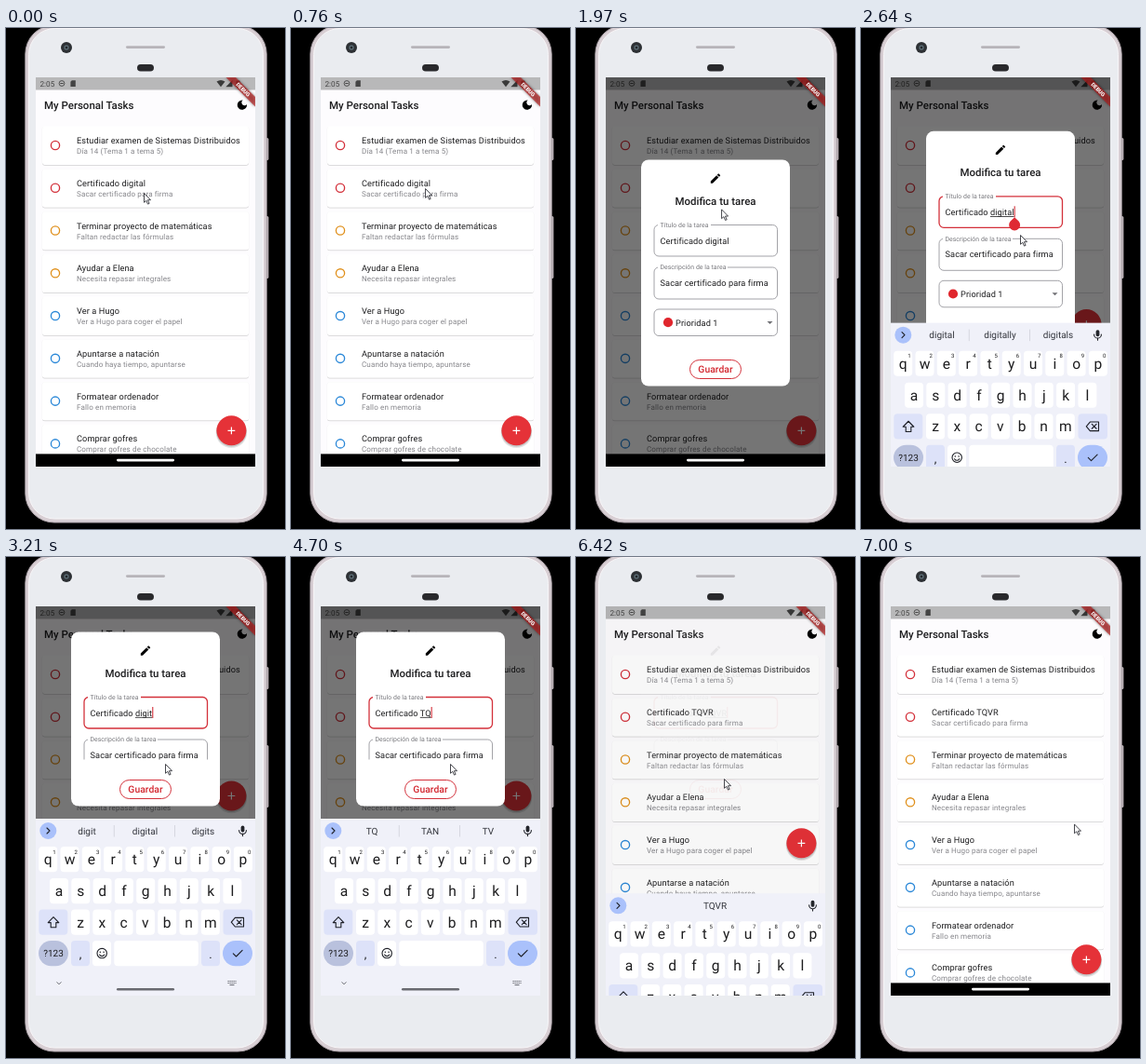
Animation of 300x538 px, one loop 7030 ms. Source, as an HTML page:

```html
<!DOCTYPE html>
<html lang="es">
<head>
<meta charset="utf-8">
<title>My Personal Tasks</title>
<style>
  html, body { margin: 0; width: 100%; height: 100%; overflow: hidden; background: #000; }
  svg { display: block; width: 100%; height: 100%; }
  text { font-family: Roboto, "Noto Sans", sans-serif; white-space: pre; fill: #1d1d1f; text-rendering: geometricPrecision; }
  .body { font-size: 9.2px; letter-spacing: .09px; }
  .sub { font-size: 8.04px; letter-spacing: .14px; fill: #85858a; }
  .head { font-size: 11.48px; font-weight: 500; }
  .label { font-size: 6.9px; letter-spacing: .04px; fill: #77777c; }
  .mid { text-anchor: middle; }
  .key { font-size: 15.6px; }
  .num { font-size: 6px; }
  .hint { font-size: 10px; fill: #33353c; }
  .line { fill: none; stroke: #1d1f26; stroke-width: 1.1; stroke-linecap: round; stroke-linejoin: round; }
  .ribbon { fill: rgba(183, 28, 28, .66); filter: drop-shadow(0 0 1.6px rgba(0, 0, 0, .7)); }
</style>
</head>
<body>
<svg id="stage" viewBox="0 0 300 538" xmlns="http://www.w3.org/2000/svg"></svg>
<script>
const LOOP = 7030;
const RED = '#d3303a', ORANGE = '#e0901c', BLUE = '#2b88d8';
const WORD = 'digital', NEW_WORD = 'TQVR';

const tasks = [
  ['Estudiar examen de Sistemas Distribuidos', 'Día 14 (Tema 1 a tema 5)', RED],
  ['Certificado digital', 'Sacar certificado para firma', RED],
  ['Terminar proyecto de matemáticas', 'Faltan redactar las fórmulas', ORANGE],
  ['Ayudar a Elena', 'Necesita repasar integrales', ORANGE],
  ['Ver a Hugo', 'Ver a Hugo para coger el papel', BLUE],
  ['Apuntarse a natación', 'Cuando haya tiempo, apuntarse', BLUE],
  ['Formatear ordenador', 'Fallo en memoria', BLUE],
  ['Comprar gofres', 'Comprar gofres de chocolate', BLUE]
];

// time, typed word, keyboard suggestions
const typing = [
  [0, WORD, 'digital', 'digitally', 'digitals'],
  [3020, 'digita', 'digita', 'digital', 'digitally'],
  [3170, 'digit', 'digit', 'digital', 'digits'],
  [3320, 'digi', 'digi', 'digital', 'dig'],
  [3450, 'dig', 'dig', 'digs', 'digital'],
  [3580, 'di', 'di', 'did', 'die'],
  [3710, 'd', 'd', 'do', 'de'],
  [3840, '', 'de', 'digital', 'del'],
  [4240, 'T', 'T', 'The', 'To'],
  [4540, 'TQ', 'TQ', 'TAN', 'TV'],
  [4900, 'TQV', '', 'TQV', ''],
  [5260, NEW_WORD, '', NEW_WORD, '']
];

// time, tip x, tip y
const pointerPath = [
  [0, 148.5, 177.5], [200, 148.5, 177.5], [800, 144.5, 172.5], [1720, 144.5, 172.5],
  [2260, 171.5, 222.5], [5480, 171.5, 222.5], [5850, 159.5, 238.5],
  [6420, 159.5, 238.5], [6920, 229.5, 287], [LOOP, 229.5, 287]
];

const T = { open: 1800, tap: 2420, rise: 2480, save: 6280, fall: 6360 };

const box = (x, y, w, h, r, fill, more = '') =>
  `<rect x="${x}" y="${y}" width="${w}" height="${h}" rx="${r}" fill="${fill}" ${more}/>`;
const dot = (x, y, r, fill, more = '') => `<circle cx="${x}" cy="${y}" r="${r}" fill="${fill}" ${more}/>`;
const text = (x, y, cls, s, more = '') => `<text x="${x}" y="${y}" class="${cls}" ${more}>${s}</text>`;
const path = (d, more = 'class="line"') => `<path d="${d}" ${more}/>`;

function phone() {
  return box(278, 118, 4.4, 24, 1.5, '#b9b0b5') + box(278, 202, 4.4, 67, 1.5, '#b9b0b5') +
    box(20.8, -3, 259.4, 534, 31, '#d8cfd4', 'stroke="#aca2a8"') +
    box(24.5, .5, 252, 526.5, 28, '#eaecf0', 'stroke="#f8f6f8"') +
    dot(65, 21, 6, '#2d3034') + dot(65, 21, 2.7, '#5a6a73') + dot(65, 21, 1.3, '#23272b') +
    box(129, 19.3, 42, 2.6, 1.3, '#b7b4b9') +
    box(141, 39, 18, 7.6, 3.8, '#29292c');
}

function statusBar() {
  return box(32, 53, 236, 13.5, 0, '#b8b8b9') +
    text(36.5, 63, '', '2:05', 'style="font-size:8.2px;fill:#444"') +
    dot(60, 59.5, 2.9, 'none', 'stroke="#444" stroke-width=".9"') + path('M58.3 59.5h3.4', 'stroke="#444"') +
    path('M70.8 56.2h4v6.8h-5.4v-5.3z', 'fill="#444"') +
    path('M226.5 57.6q4.5-3.4 9 0l-4.5 5.6z', 'fill="#3a3a3a"') +
    path('M243.5 56v7.2h-7.2z', 'fill="#3a3a3a"') +
    box(247.5, 56.4, 4, 6.8, .6, '#3a3a3a');
}

function card([title, note, color], i) {
  const y = 126.3 + 45.77 * i;
  return box(38.8, y - 20.4, 222.4, 41.6, 2.6, '#000', 'opacity=".08"') +
    box(39.3, y - 19.6, 221.4, 41, 2.4, '#000', 'opacity=".13"') +
    box(39, y - 20.6, 222, 41.2, 2.3, '#fff') +
    dot(53, y - .3, 4.6, 'none', `stroke="${color}" stroke-width="1.35"`) +
    text(76, y - 2.2, 'body', title, `id="task${i}"`) + text(76, y + 8.8, 'sub', note);
}

function app() {
  const moon = 'M12 3a9 9 0 1 0 9 9c0-.46-.04-.92-.1-1.36a5.39 5.39 0 0 1-4.4 2.26 5.4 5.4 0 0 1-3.14-9.8c-.44-.06-.9-.1-1.36-.1z';
  return box(32, 53, 236, 405, 0, '#fdfcfe') + tasks.map(card).join('') +
    statusBar() + text(41, 87, 'head', 'My Personal Tasks') +
    path(moon, 'transform="translate(247 75.8) scale(.574)" fill="#000"') +
    `<g id="fab">${dot(0, 2, 16.8, '#000', 'opacity=".1"')}${dot(0, 1.2, 16.3, '#000', 'opacity=".14"')}` +
    `${dot(0, 0, 16, '#e53238')}${path('M-3.9 0h7.8M0-3.9v7.8', 'stroke="#fff" stroke-width="1.2"')}</g>`;
}

function field(y, h, color, width, label, labelEnd) {
  return box(84, y, 132.5, h, 5, 'none', `stroke="${color}" stroke-width="${width}"`) +
    (label ? box(88, y - 2, labelEnd - 88, 4, 0, '#fff') + text(90.5, y + 2.4, 'label', label) : '');
}

function dialog() {
  const pencil = 'M3 17.25V21h3.75L17.81 9.94l-3.75-3.75zM20.71 7.04a1 1 0 0 0 0-1.41l-2.34-2.34a1 1 0 0 0-1.41 0l-1.83 1.83 3.75 3.75z';
  return `<g id="dialog"><rect id="panel" x="70" width="160" height="243" rx="8" fill="#fff"/>
    ${path(pencil, 'transform="translate(143.1 13.2) scale(.574)" fill="#000"')}
    ${text(150, 48, 'head mid', 'Modifica tu tarea')}
    <g clip-path="url(#contentClip)">
      <g id="calm">${field(70, 33.5, '#8c8c92', .8, 'Título de la tarea', 145)}</g>
      <g id="focus">${field(70, 33.5, RED, 1.3, 'Título de la tarea', 145)}</g>
      ${text(90.5, 90, 'body', '', 'id="entry"')}
      <rect id="under" y="91.4" height=".8" fill="#1d1d1f"/>
      <rect id="caret" y="80.5" width="1.1" height="12" fill="${RED}"/>
      ${field(115.5, 34, '#8c8c92', .8, 'Descripción de la tarea', 163)}
      ${text(90.5, 135.3, 'body', 'Sacar certificado para firma')}
      ${field(160.5, 28.5, '#8c8c92', .8)}
      ${dot(99, 174.7, 5.1, '#e0262d')}${text(107, 178, 'body', 'Prioridad 1')}
      ${path('M205.5 173.4h6l-3 3z', 'fill="#707075"')}
    </g>
    <g id="handle">${path('M0 92.5l4.5 4.1a6 6 0 1 1-9 0z', 'fill="#df2a33"')}</g>
    <g id="save">${box(122.5, 0, 55, 20, 10, '#fff', `stroke="${RED}"`)}
      ${text(150, 13.7, 'mid', 'Guardar', 'style="font-size:10.33px;font-weight:500;letter-spacing:.06px;fill:#d3262f"')}</g></g>`;
}

function keyRow(letters, x0, y, numbers) {
  return [...letters].map((c, i) => {
    const x = x0 + 23.3 * i;
    return box(x - 10, y, 20, 27.2, 4, '#fff') + text(x, y + 19, 'key mid', c) +
      (numbers ? text(x + 6.8, y + 7.6, 'num mid', (i + 1) % 10) : '');
  }).join('');
}

function keyboard() {
  const soft = '#dde2f9', accent = '#aac1fb';
  return `<g id="keyboard">` + box(32, 281, 236, 191, 0, '#f0f1f9') +
    dot(45.3, 294, 9, accent) + path('M44 291l3 3l-3 3') +
    [87, 149.5, 212].map((x, i) => text(x, 297.6, 'hint mid', '', `id="hint${i}"`)).join('') +
    path('M116.3 288v12.5M181.5 288v12.5', 'id="bars" stroke="#cfd1da" stroke-width=".8"') +
    box(252.6, 288.5, 3.8, 7, 1.9, '#23252b') + path('M250.6 293.5a3.9 3.9 0 0 0 7.8 0M254.5 297.6v2') +
    keyRow('qwertyuiop', 45.2, 311, true) + keyRow('asdfghjkl', 57, 345) + keyRow('zxcvbnm', 80, 378.6) +
    box(35.3, 378.6, 31, 27.2, 4, soft) + path('M51 386.6l5.8 6h-3v5.2h-5.6v-5.2h-3z') +
    box(233.5, 378.6, 31.5, 27.2, 4, soft) +
    path('M246.3 387.4h9.2v9.6h-9.2l-4-4.8zM248.3 389.8l4.8 4.8M253.1 389.8l-4.8 4.8') +
    box(35, 412, 32, 27.2, 13.6, '#b9c1dd') + text(51, 429.3, 'mid', '?123', 'style="font-size:10px"') +
    box(70, 412, 20, 27.2, 4, soft) + text(80, 431, 'mid', ',', 'style="font-size:13px"') +
    box(93, 412, 20, 27.2, 4, '#fff') + dot(103.2, 425.6, 5.2, 'none', 'class="line"') +
    dot(101.3, 424.3, .8, '#1d1f26') + dot(105.1, 424.3, .8, '#1d1f26') + path('M100.6 427a2.9 2.9 0 0 0 5.2 0') +
    box(116.3, 412, 90.5, 27.2, 4, '#fff') +
    box(210, 412, 20, 27.2, 4, soft) + text(220, 431, 'mid', '.', 'style="font-size:13px"') +
    box(233, 412, 32, 27.2, 13.6, accent) + path('M244.3 425.8l3.2 3.2l6.6-6.6') +
    path('M54.6 456.4l2.4 2.4l2.4-2.4', 'fill="none" stroke="#55575e" stroke-width=".9"') +
    box(119, 463, 62, 2.4, 1.2, '#6a6b71') +
    path('M238.5 455.5h9M238.5 457.5h9', 'stroke="#55575e" stroke-width="1.1" stroke-dasharray="1.2 .8"') +
    path('M240.5 459.6h5', 'stroke="#55575e" stroke-width=".9"') + '</g>';
}

function banner() {
  return path('M236.5 53h10.5L268 74v10.5z', 'class="ribbon"') +
    `<g transform="translate(255 66) rotate(45)">` +
    text(0, 2.1, 'mid', 'DEBUG', 'style="font-size:5.8px;font-weight:900;fill:#fff"') + '</g>';
}

document.getElementById('stage').innerHTML = `
  <defs>
    <clipPath id="screenClip"><rect x="32" y="53" width="236" height="418"/></clipPath>
    <clipPath id="contentClip"><rect id="content" x="70" y="60" width="160" height="133"/></clipPath>
  </defs>
  ${phone()}
  <g clip-path="url(#screenClip)">
    ${app()}
    <rect id="scrim" x="32" y="53" width="236" height="405" fill="#000"/>
    ${box(32, 457.4, 236, 14, 0, '#000')}${box(119, 462.8, 62, 2.6, 1.3, '#fff')}
    ${dialog()}${banner()}${keyboard()}
  </g>
  <g id="pointer">${path('M0 0v9.8l2.3-2l1.7 3.8l1.6-.7l-1.7-3.7h3.1z', 'fill="#fff" stroke="#33343a" stroke-width=".9" stroke-linejoin="round"')}</g>`;

const el = {};
document.querySelectorAll('#stage [id]').forEach(n => el[n.id] = n);

const ramp = (t, a, b) => Math.min(1, Math.max(0, (t - a) / (b - a)));
const mix = (a, b, p) => a + (b - a) * p;
const easeOut = (p, n) => 1 - (1 - p) ** n;
const smooth = p => p * p * (3 - 2 * p);
const set = (node, attrs) => { for (const k in attrs) node.setAttribute(k, attrs[k]); };
const move = (node, x, y) => node.setAttribute('transform', `translate(${x} ${y})`);
const show = (node, on) => node.setAttribute('visibility', on ? 'inherit' : 'hidden');
const put = (node, s) => { if (node.textContent !== s) node.textContent = s; };

function drawPointer(t) {
  const i = pointerPath.findIndex(p => p[0] > t);
  const [t0, x0, y0] = pointerPath[i - 1], [t1, x1, y1] = pointerPath[i];
  const p = smooth(ramp(t, t0, t1));
  move(el.pointer, mix(x0, x1, p), mix(y0, y1, p));
}

function drawEntry(t, focused) {
  const [since, word, ...hints] = typing.filter(s => s[0] <= t).pop();
  put(el.entry, 'Certificado ' + word);
  const end = 90.5 + el.entry.getComputedTextLength();
  const start = word ? 90.5 + el.entry.getSubStringLength(0, 12) : end;
  set(el.under, { x: start, width: Math.max(0, end - start) });
  set(el.caret, { x: end });
  move(el.handle, end + .5, 0);
  const blinkOn = (t - Math.max(since, T.tap)) % 1000 < 500;
  show(el.under, focused);
  show(el.caret, focused && blinkOn);
  show(el.handle, focused && t < typing[1][0]);
  hints.forEach((h, i) => put(el['hint' + i], h));
  show(el.bars, hints[0] !== '');
}

function draw(t) {
  const focused = t >= T.tap;
  const seen = ramp(t, T.open, T.open + 150) * (1 - ramp(t, T.save, T.save + 150));
  const up = ramp(t, T.rise, T.rise + 320), down = ramp(t, T.fall, T.fall + 300);
  const kb = easeOut(up, 2.4) - easeOut(down, 2.4);
  const inset = easeOut(up, 1.5) - easeOut(down, 1.5);

  move(el.fab, 242.4, mix(432.3, 256.5, inset));
  move(el.keyboard, 0, mix(191, 0, kb));
  show(el.keyboard, kb > 0);
  put(el.task1, 'Certificado ' + (t < T.save + 40 ? WORD : NEW_WORD));

  set(el.scrim, { opacity: .54 * seen });
  set(el.dialog, { opacity: seen });
  show(el.dialog, seen > 0);
  const h = mix(243, 187, ramp(up, .5, 1));
  move(el.dialog, 0, mix(141.5, 80.5, up));
  set(el.panel, { height: h });
  set(el.content, { height: h - 50 - 60 });
  move(el.save, 0, h - 28);
  show(el.calm, !focused);
  show(el.focus, focused);
  drawEntry(t, focused);
  drawPointer(t);
}

function tick() {
  draw(performance.now() % LOOP);
  requestAnimationFrame(tick);
}
tick();
</script>
</body>
</html>
```
